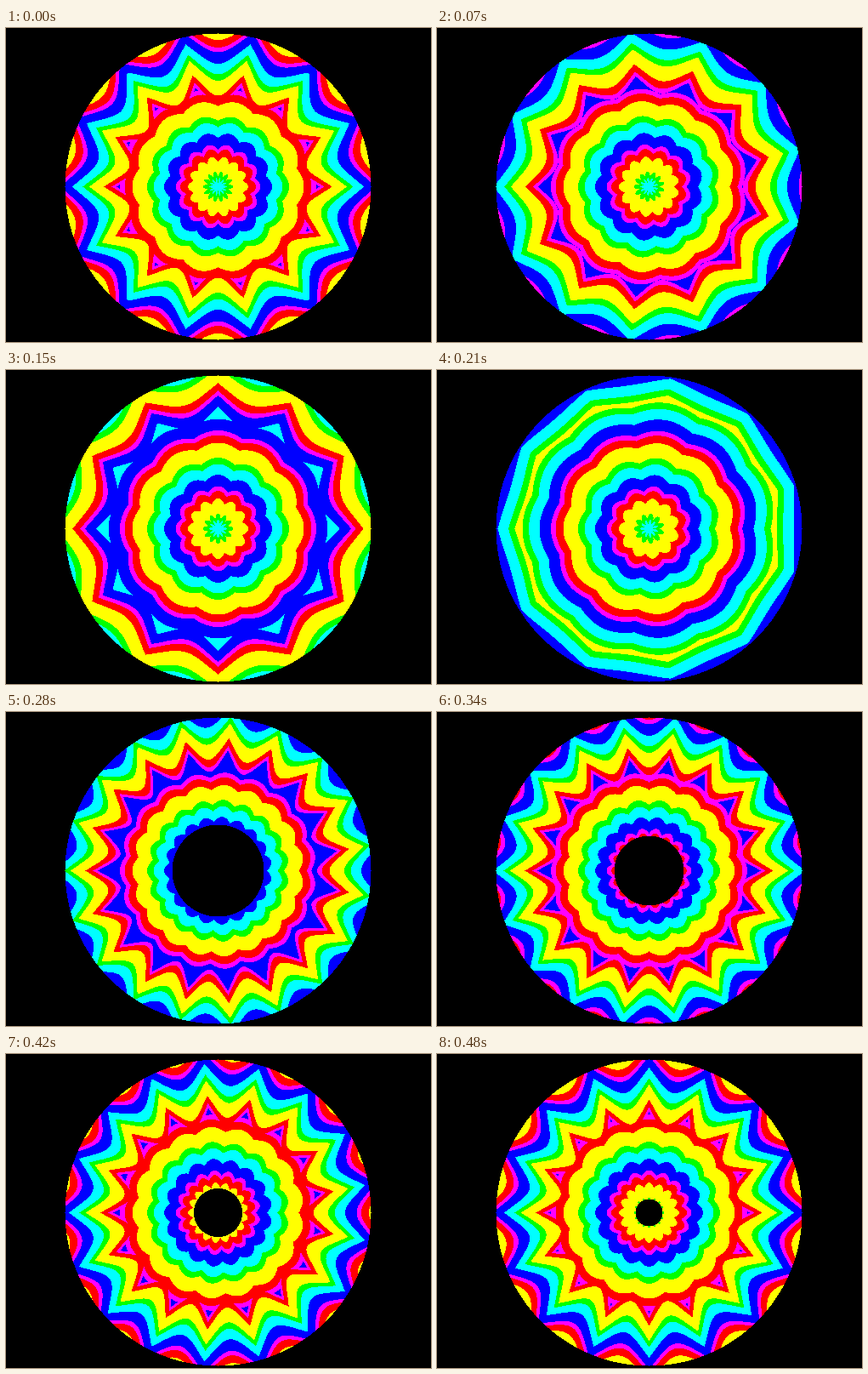
Write an HTML page with a canvas that moves like this. It is 500 by 369 pixels and loops after 0.56 s.

```html
<!DOCTYPE html>
<html lang="en">
<head>
<meta charset="utf-8">
<title>Rainbow rosette</title>
<style>
  html, body { margin: 0; width: 100%; height: 100%; overflow: hidden; background: #000; }
  canvas { display: block; width: 500px; height: 369px; }
</style>
</head>
<body>
<canvas id="stage" width="500" height="369"></canvas>
<script>
const WIDTH = 500, HEIGHT = 369, CX = 249, CY = 186, RADIUS = 180;
const LOOP = 560, PERIOD = 65.5, SCALLOP = 6;

// Each band runs up to its limit within one colour period.
const BANDS = [
  { limit: 10.5, rgb: [0, 255, 255] },
  { limit: 18, rgb: [0, 255, 0] },
  { limit: 35.5, rgb: [255, 255, 0] },
  { limit: 44.5, rgb: [255, 0, 0] },
  { limit: 50, rgb: [255, 0, 255] },
  { limit: 63.5, rgb: [0, 0, 255] },
  { limit: PERIOD, rgb: [0, 255, 255] }
];

// reach: where the outer waves start; spike: how far their cusps stick out.
const POSES = [
  { start: 0, points: 14, reach: 208, spike: 27, hole: 0 },
  { start: 70, points: 13, reach: 226, spike: 20, hole: 0 },
  { start: 150, points: 12, reach: 251, spike: 21, hole: 0 },
  { start: 210, points: 11, reach: 299, spike: 8, hole: 0 },
  { start: 280, points: 19, reach: 232, spike: 25, hole: 54 },
  { start: 340, points: 18, reach: 222, spike: 25, hole: 41 },
  { start: 420, points: 17, reach: 213, spike: 26, hole: 28.5 },
  { start: 480, points: 16, reach: 207, spike: 27, hole: 16 }
];

const ctx = document.getElementById('stage').getContext('2d');

function colourAt(x, y, pose) {
  const r = Math.hypot(x, y);
  if (r > RADIUS || r < pose.hole) return [0, 0, 0];
  const half = pose.points * Math.atan2(y, -x) / 2;
  const inner = r + SCALLOP * (1 - Math.abs(Math.cos(half)));
  const outer = pose.reach - r + pose.spike * (1 - Math.abs(Math.sin(half)));
  const level = Math.min(inner, outer) % PERIOD;
  return BANDS.find(band => level < band.limit).rgb;
}

function render(pose) {
  const image = ctx.createImageData(WIDTH, HEIGHT);
  let i = 0;
  for (let y = 0; y < HEIGHT; y++) {
    for (let x = 0; x < WIDTH; x++, i += 4) {
      image.data.set(colourAt(x - CX, y - CY, pose), i);
      image.data[i + 3] = 255;
    }
  }
  return image;
}

const images = POSES.map(render);
const origin = performance.now();
let shown = -1;

function draw() {
  const time = (performance.now() - origin) % LOOP;
  const index = POSES.filter(pose => pose.start <= time).length - 1;
  if (index !== shown) {
    ctx.putImageData(images[index], 0, 0);
    shown = index;
  }
  requestAnimationFrame(draw);
}
draw();
</script>
</body>
</html>
```
